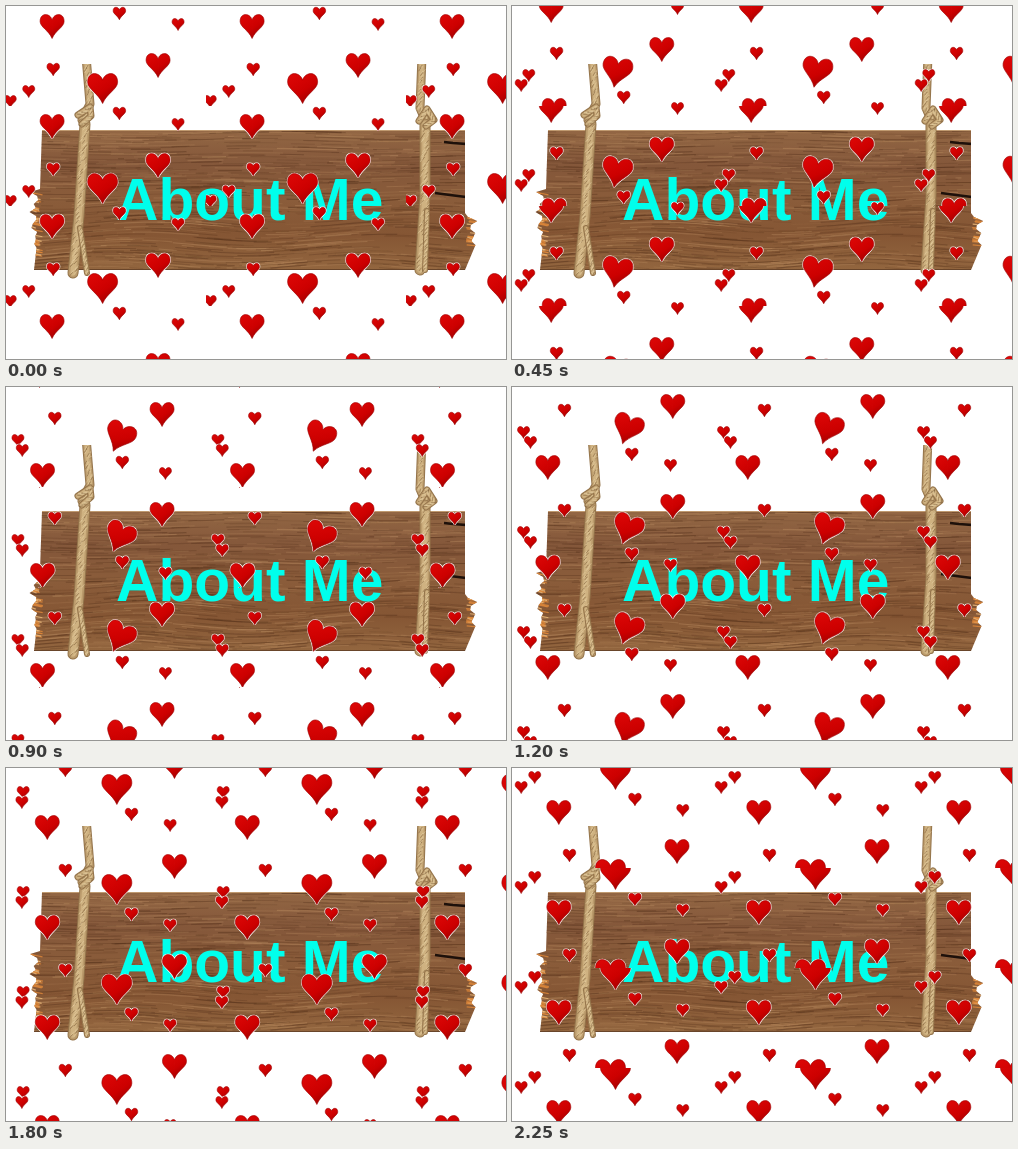
An HTML page with a canvas that plays this animation: 500 px wide and 353 px high, repeating every 2.4 s.

```html
<!DOCTYPE html>
<html lang="en">
<head>
<meta charset="utf-8">
<title>About Me</title>
<style>
html, body { margin: 0; width: 100%; height: 100%; overflow: hidden; background: #fff; }
canvas { display: block; }
</style>
</head>
<body>
<canvas id="stage" width="500" height="353"></canvas>
<script>
const WIDTH = 500, HEIGHT = 353, STEP = 150, STEPS = 16, TILE_W = 200, TILE_H = 100;

// Climb shared by all hearts, as [step, pixels]
const CLIMB = [[0, 0], [2, 8], [4, 24], [8, 40], [10, 52], [12, 61], [15, 76]];

// Each heart sways around x by amp and is farthest right when the climb equals peak.
// drift is the sideways offset of the copy that enters at the bottom.
const hearts = [
  { size: 24, x: 41, y: 20, amp: 7, peak: 88, drift: 3 },
  { size: 24, x: 159, y: 59, amp: 9.5, peak: 62 },
  { size: 30, x: 104.5, y: 82, amp: 9, peak: 42, drift: -5, tilt: .42 },
  { size: 12.5, x: 52, y: 63, amp: 7.5, peak: 64 },
  { size: 12, x: 18, y: 85, amp: 6.5, peak: 88 },
  { size: 12, x: 11.5, y: 95, amp: 7.5, peak: 46 },
  { size: 12.5, x: 118.5, y: 7, amp: 7, peak: 62 },
  { size: 12, x: 166, y: 18, amp: 7.5, peak: 90 }
];

function layer(width, height) {
  const canvas = document.createElement('canvas');
  canvas.width = width;
  canvas.height = height;
  return canvas.getContext('2d');
}

const ctx = document.getElementById('stage').getContext('2d');
const sign = layer(WIDTH, HEIGHT);
const tile = layer(TILE_W, TILE_H);

let seed = 7;
function random(min = 0, max = 1) {
  seed = (seed * 16807) % 2147483647;
  return min + (max - min) * seed / 2147483647;
}

function line(c, points, color, width) {
  c.strokeStyle = color;
  c.lineWidth = width;
  c.beginPath();
  points.forEach(([x, y]) => c.lineTo(x, y));
  c.stroke();
}

function drawPlank(c) {
  c.save();
  c.beginPath();
  c.moveTo(36, 124);
  c.lineTo(459, 124);
  c.lineTo(459, 207);
  for (let y = 211; y < 240; y += 4) c.lineTo(random(462, 472), y);
  c.lineTo(459, 264);
  c.lineTo(28, 264);
  for (let y = 242; y > 184; y -= 4) c.lineTo(random(23, 33), y);
  c.lineTo(34, 183);
  c.clip();

  const wood = c.createLinearGradient(0, 124, 0, 264);
  ['#936744', '#84573a', '#8a5c3a', '#855634', '#93663f']
    .forEach((color, i) => wood.addColorStop(i / 4, color));
  c.fillStyle = wood;
  c.fillRect(0, 120, WIDTH, 150);

  for (let i = 0; i < 900; i++) {
    const x = random(10, 450), y = random(124, 264), length = random(10, 70);
    const bend = y > 195 ? 3.5 : 1.2, points = [];
    for (let u = 0; u <= length; u += 6) points.push([x + u, y + bend * Math.sin((x + u) / 40 + y / 30)]);
    c.globalAlpha = random(.12, .42);
    line(c, points, i % 5 < 3 ? '#4e2c17' : '#bd9064', random(.5, 1.3));
  }
  for (let i = 0; i < 50; i++) {
    const y = random(185, 248), color = i % 3 ? '#e0893a' : '#f0bd7c';
    c.globalAlpha = .8;
    line(c, [[22, y], [random(29, 37), y + 3]], color, 1.2);
    if (y > 206 && y < 240) line(c, [[472, y], [random(460, 465), y - 1]], color, 1.2);
  }
  c.globalAlpha = 1;
  line(c, [[36, 124.5], [459, 124.5]], '#c09a70', 1);
  line(c, [[28, 263.5], [459, 263.5]], '#69452a', 1);
  line(c, [[438, 136], [447, 137], [460, 138]], '#1d100a', 2.5);
  line(c, [[429, 187], [444, 189], [460, 191]], '#1d100a', 2.5);
  c.restore();
}

// A soft cord covered with short slanted fibres
function drawCord(c, points, width) {
  c.lineJoin = c.lineCap = 'round';
  line(c, points, '#94744b', width);
  line(c, points, '#bb9b6c', width - 2);
  line(c, points, '#cfb281', width / 2);
  for (let i = 1; i < points.length; i++) {
    const [x0, y0] = points[i - 1], [x1, y1] = points[i];
    const length = Math.hypot(x1 - x0, y1 - y0), half = width / 2 - 1;
    c.save();
    c.translate(x0, y0);
    c.rotate(Math.atan2(y1 - y0, x1 - x0));
    c.globalAlpha = .6;
    for (let u = 0; u < length; u += 1.5) {
      const v = random(-half, half - 2);
      line(c, [[u, v], [u + 3, v + 2]], u % 4 < 1.5 ? '#7d5d38' : '#e6d0a4', .9);
    }
    c.restore();
  }
}

function drawSign(c) {
  drawPlank(c);
  c.save();
  c.beginPath();
  c.rect(0, 58, WIDTH, 220);
  c.clip();
  drawCord(c, [[80, 50], [84, 98], [76, 114]], 9);
  drawCord(c, [[79, 118], [73, 210], [67, 267]], 11);
  drawCord(c, [[74, 222], [81, 267]], 6);
  drawCord(c, [[72, 109], [84, 101], [85, 110], [76, 118]], 7);
  drawCord(c, [[416, 50], [414, 102], [420, 116]], 9);
  drawCord(c, [[419, 118], [419, 190], [414, 264]], 11);
  drawCord(c, [[421, 205], [419, 264]], 6);
  drawCord(c, [[413, 115], [421, 103], [428, 114], [420, 120]], 7);
  c.restore();
  c.font = 'bold 58.7px "Liberation Sans", Arial, sans-serif';
  c.fillStyle = '#00ffec';
  c.fillText('About Me', 110, 213.5);
}

// Heart outline in a unit box
const heartShape = new Path2D();
heartShape.moveTo(0, -.28);
for (const side of [1, -1]) {
  heartShape.moveTo(0, -.28);
  heartShape.bezierCurveTo(.08 * side, -.56, .5 * side, -.6, .5 * side, -.21);
  heartShape.bezierCurveTo(.5 * side, .02, .14 * side, .16, 0, .5);
}

function drawHeart(c, size, x, y, angle) {
  c.save();
  c.translate(x, y + .5);
  c.rotate(angle);
  c.scale(size, size);
  c.strokeStyle = '#fff';
  c.lineWidth = 1.8 / size;
  c.stroke(heartShape);
  const red = c.createLinearGradient(-.3, -.5, .3, .4);
  red.addColorStop(0, '#dc0606');
  red.addColorStop(.6, '#cc0000');
  red.addColorStop(1, '#a00000');
  c.fillStyle = red;
  c.fill(heartShape);
  c.strokeStyle = '#9c0000';
  c.lineWidth = .6 / size;
  c.stroke(heartShape);
  c.restore();
}

function climbAt(step) {
  const i = Math.max(1, CLIMB.findIndex(([key]) => key >= step));
  const [s0, y0] = CLIMB[i - 1], [s1, y1] = CLIMB[i];
  return y0 + (y1 - y0) * (step - s0) / (s1 - s0);
}

function draw(now) {
  const climb = climbAt(Math.floor(now / STEP) % STEPS);
  const lean = Math.max(0, Math.sin(Math.PI * (climb - 10) / 42));

  tile.clearRect(0, 0, TILE_W, TILE_H);
  for (const { size, x, y, amp, peak, drift = 0, tilt = 0 } of hearts) {
    const sway = amp * Math.cos(2 * Math.PI * (climb - peak) / TILE_H);
    for (let copy = 0; copy < 2; copy++) {
      const shift = drift * (copy - climb / TILE_H);
      drawHeart(tile, size, x + sway + shift, y - climb + TILE_H * copy, tilt * lean);
    }
  }

  ctx.fillStyle = '#fff';
  ctx.fillRect(0, 0, WIDTH, HEIGHT);
  ctx.drawImage(sign.canvas, 0, 0);
  for (let x = 0; x < WIDTH; x += TILE_W)
    for (let y = 0; y < HEIGHT; y += TILE_H) ctx.drawImage(tile.canvas, x, y);
}

drawSign(sign);
const start = performance.now();
function tick() {
  draw(performance.now() - start);
  requestAnimationFrame(tick);
}
tick();
</script>
</body>
</html>
```
